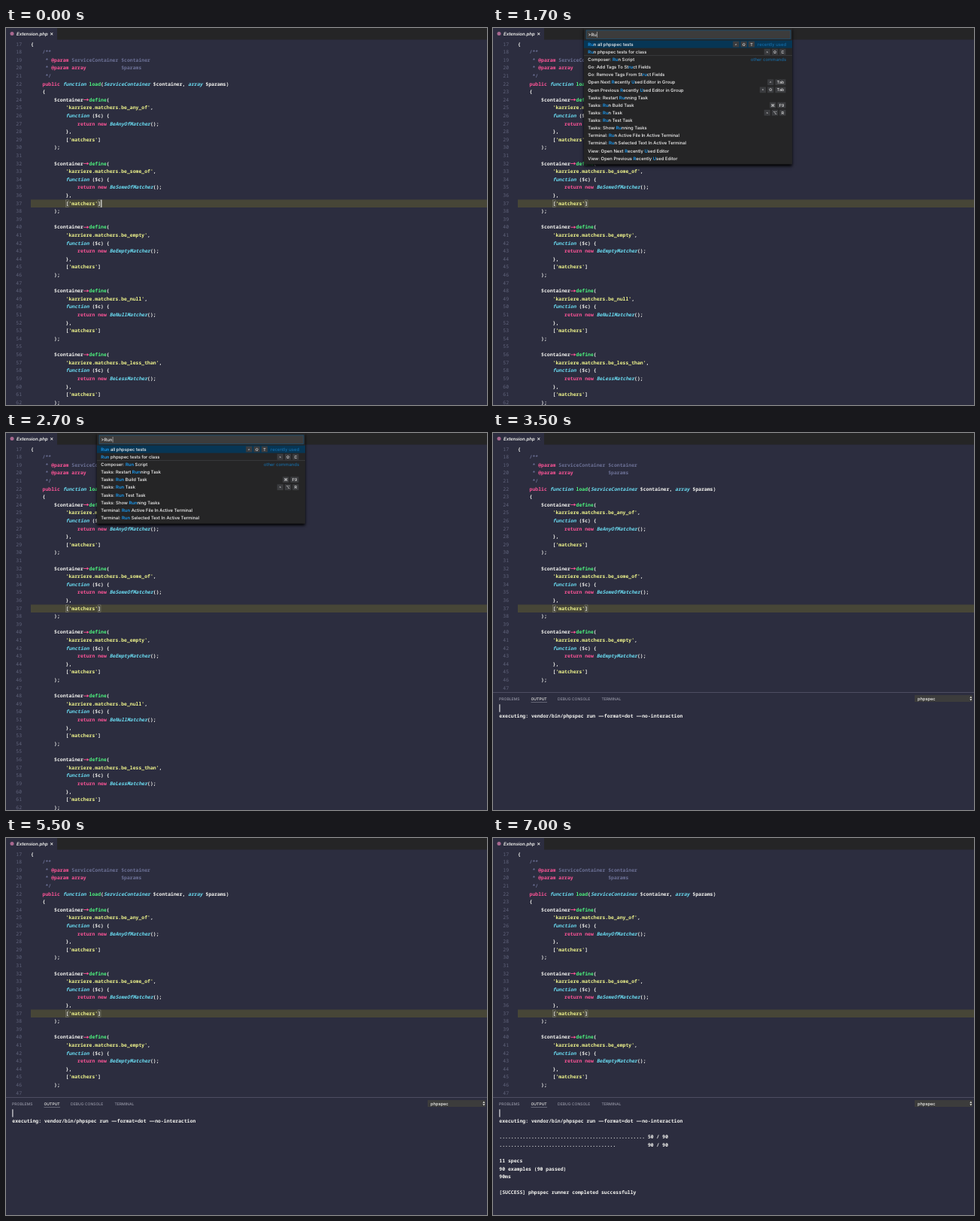
Animation, 640 px wide and 502 px high, one loop 7100 ms. Source, as an HTML page with a canvas:

```html
<!DOCTYPE html>
<html lang="en">
<head>
<meta charset="utf-8">
<title>Running specs from the editor</title>
<style>
html, body { margin: 0; width: 100%; height: 100%; overflow: hidden; background: #2c2d3f; }
canvas { display: block; }
</style>
</head>
<body>
<canvas id="stage" width="640" height="502"></canvas>
<script>
const ctx = document.getElementById('stage').getContext('2d');
ctx.textRendering = 'geometricPrecision';

const LOOP = 7100, OPEN = 900, TYPE_RU = 1600, TYPE_RUN = 1800, RUN = 3000, DONE = 6700;
const CHAR = 3.875, LINE = 10.605, ROW = 10.13, UI = 5.92;
const BG = '#2c2d3f', WHITE = '#f6f6f2', PINK = '#fb5496', CYAN = '#6adcf2',
  GREEN = '#4df57f', YELLOW = '#f0f58c', COMMENT = '#6c7196', BLUE = '#1a9cf5';

const definition = (id, name) => `        $container->define(
            'karriere.matchers.be_${id}',
            function ($c) {
                return new Be${name}Matcher();
            },
            ['matchers']
        );
`;
const source = `{
    /**
     * @param ServiceContainer $container
     * @param array            $params
     */
    public function load(ServiceContainer $container, array $params)
    {
` + [['any_of', 'AnyOf'], ['some_of', 'SomeOf'], ['empty', 'Empty'], ['null', 'Null'], ['less_than', 'Less']]
  .map(([id, name]) => definition(id, name)).join('\n');
const sourceLines = source.trimEnd().split('\n');

const recent = `Run all phpspec tests|^ ⇧ T
Run phpspec tests for class|^ ⇧ C
`;
const palettes = {
  '>': { split: 13, match: null, list: recent + `Simple PHP CS Fixer: Fix
Project Manager: Save Project
Extensions: Check for Updates
Sync : Download Settings|⇧ ⌥ D
Extensions: Enable Auto Updating Extensions
New PHP Class
New PHP File
Check PHP import
Extensions: Install Extensions
Go: Add Import
Preferences: File Icon Theme
Add Cursor Above|⌥ ⌘ ↑
Add Cursor Below|⌥ ⌘ ↓
Add Cursors to Line Ends|⇧ ⌥ I
Add Line Comment|⌘ K ⌘ C
Add Selection To Next Find Match|^ G
Add Selection To Previous Find Match
Change All Occurrences|⌘ F2` },
  '>Ru': { split: 2, match: /(ru|R(?=ecently)|U(?=sed))/i, list: recent + `Composer: Run Script
Go: Add Tags To Struct Fields
Go: Remove Tags From Struct Fields
Open Next Recently Used Editor in Group|^ Tab
Open Previous Recently Used Editor in Group|^ ⇧ Tab
Tasks: Restart Running Task
Tasks: Run Build Task|⌘ F9
Tasks: Run Task|^ ⌥ R
Tasks: Run Test Task
Tasks: Show Running Tasks
Terminal: Run Active File In Active Terminal
Terminal: Run Selected Text In Active Terminal
View: Open Next Recently Used Editor
View: Open Previous Recently Used Editor` },
  '>Run': { split: 2, match: /(run)/i, list: recent + `Composer: Run Script
Tasks: Restart Running Task
Tasks: Run Build Task|⌘ F9
Tasks: Run Task|^ ⌥ R
Tasks: Run Test Task
Tasks: Show Running Tasks
Terminal: Run Active File In Active Terminal
Terminal: Run Selected Text In Active Terminal` }
};

const report = ['', '', '', '.'.repeat(50) + ' 50 / 90', '.'.repeat(40) + ' '.repeat(11) + '90 / 90', '',
  '11 specs', '90 examples (90 passed)', '90ms', '', '[SUCCESS] phpspec runner completed successfully'];

function rect(x, y, w, h, color) {
  ctx.fillStyle = color;
  ctx.fillRect(x, y, w, h);
}

// Proportional text, vertically centred on y; returns its width.
function label(text, x, y, color, size = UI, style = '500', align = 'left') {
  ctx.font = `${style} ${size}px Inter, "DejaVu Sans", sans-serif`;
  ctx.textAlign = align;
  ctx.fillStyle = color;
  ctx.fillText(text, x, y + size * 0.36);
  return ctx.measureText(text).width;
}

// Monospaced text on a fixed grid, with joined "--" and "->".
function mono(text, x, y, color, style = '600') {
  ctx.font = `${style} 6.46px "Noto Sans Mono", monospace`;
  ctx.textAlign = 'left';
  ctx.fillStyle = color;
  for (let i = 0; i < text.length; i++, x += CHAR) {
    const pair = text.substr(i, 2);
    if (pair === '--' || pair === '->') {
      ctx.fillRect(x + 0.5, y - 0.4, 6.6, 0.9);
      if (pair === '->') {
        ctx.beginPath();
        ctx.moveTo(x + 5, y - 2);
        ctx.lineTo(x + 7.5, y);
        ctx.lineTo(x + 5, y + 2);
        ctx.fill();
      }
      i++;
      x += CHAR;
    } else if (text[i] !== ' ') ctx.fillText(text[i], x, y + 2.2);
  }
}

function codeLine(line, y) {
  const isComment = /^\s*(\/\*|\*)/.test(line);
  const rule = isComment ? /(@param|array)|[^@a]+|./g
    : /('[^']*')|(->)|(return new|public)|(function|\w*Matcher\b|ServiceContainer|array\b)|(load|define)|\w+|[^'\w-]+/g;
  for (const m of line.matchAll(rule)) {
    const x = 33 + m.index * CHAR;
    if (isComment) mono(m[0], x, y, m[1] ? PINK : COMMENT);
    else if (m[4]) mono(m[0], x, y, CYAN, 'italic 600');
    else mono(m[0], x, y, m[1] ? YELLOW : m[2] || m[3] ? PINK : m[5] ? GREEN : WHITE);
  }
}

function editor(showCaret) {
  rect(0, 0, 640, 502, BG);
  rect(33, 228.5, 607, 10.5, '#474637');
  ctx.lineWidth = 0.4;
  ctx.strokeStyle = '#96968a';
  for (const col of [12, 23]) ctx.strokeRect(33 + col * CHAR, 229, CHAR, 9.2);
  sourceLines.forEach((line, i) => {
    const y = 21.3 + i * LINE, number = String(i + 17);
    mono(number, 21 - number.length * CHAR, y, '#61647c', '400');
    codeLine(line, y);
  });
  if (showCaret) rect(126.4, 228.6, 1, 10.3, '#ffffff');
  rect(68, 0, 572, 15.5, '#252526');
  ctx.fillStyle = '#a8688f';
  ctx.beginPath();
  ctx.arc(8, 7.5, 2.5, 0, 7);
  ctx.fill();
  label('Extension.php', 14, 7.7, WHITE, 6, 'italic 600');
  label('×', 58.3, 7.5, WHITE, 7.5);
}

// Key caps laid out from right to left.
function keyCaps(keys, right, y) {
  for (const key of keys.split(' ').reverse()) {
    const width = key === 'Tab' ? 14 : key.length > 1 ? 11 : 8.2;
    rect(right - width, y - 3.9, width, 7.8, '#3b3c3f');
    label(key, right - width / 2, y + (key === '^' ? 1 : 0), '#e6e6e6', 5.3, '500', 'center');
    right -= width + 2.1;
  }
}

function palette(query) {
  const { split, match, list } = palettes[query];
  const rows = list.split('\n');
  ctx.save();
  ctx.shadowColor = '#000';
  ctx.shadowBlur = 3.7;
  ctx.shadowOffsetY = 2.3;
  rect(121, 0, 277, 19.4 + rows.length * ROW, '#252526');
  ctx.restore();
  rect(124, 3, 272, 11.5, '#3c3c3c');
  ctx.lineWidth = 0.5;
  ctx.strokeStyle = '#0e639c';
  ctx.strokeRect(124, 3, 272, 11.5);
  const queryWidth = label(query, 126.5, 8.7, '#e6e6e6');
  rect(126.9 + queryWidth, 5, 0.6, 7.6, '#d0d0d0');
  rect(121, 16.5, 277, ROW, '#073655');
  rect(121, 16.5 + split * ROW - 0.3, 277, 0.6, '#45464c');
  rows.forEach((row, i) => {
    const [title, keys] = row.split('|'), y = 21.6 + i * ROW;
    let x = 126.3, right = 389.5;
    (match ? title.split(match) : [title]).forEach((part, n) => {
      x += label(part, x, y, n % 2 ? BLUE : '#f6f6f6', UI, n % 2 ? '600' : '500');
    });
    const group = i === 0 ? 'recently used' : i === split ? 'other commands' : '';
    if (group) right -= label(group, 390, y, '#1674b4', UI, '400', 'right') + 3.5;
    if (keys) keyCaps(keys, right, y);
  });
}

function panel(done) {
  rect(0, 345, 640, 157, BG);
  rect(0, 345, 640, 0.8, '#55566a');
  const tabs = [['PROBLEMS', 8], ['OUTPUT', 50.5], ['DEBUG CONSOLE', 86], ['TERMINAL', 144.5]];
  for (const [name, x] of tabs) label(name, x, 353.7, name === 'OUTPUT' ? WHITE : '#9596a5', 5.05);
  rect(50.5, 358.2, 21.5, 0.6, '#8b8c9c');
  rect(561, 349, 77, 9, '#3c3c3c');
  label('phpspec', 565, 353.5, WHITE, 5.7);
  ctx.fillStyle = WHITE;
  for (const dir of [-1, 1]) {
    ctx.beginPath();
    ctx.moveTo(634.3, 353.5 + dir * 0.7);
    ctx.lineTo(637.3, 353.5 + dir * 0.7);
    ctx.lineTo(635.8, 353.5 + dir * 2.8);
    ctx.fill();
  }
  rect(8.4, 361.3, 1, 10.3, '#ffffff');
  const output = (text, row) => mono(text, 8.3, 366.5 + row * 10.55, WHITE);
  output('executing: vendor/bin/phpspec run --format=dot --no-interaction', 1);
  if (done) report.forEach(output);
}

function draw(now) {
  const t = now % LOOP;
  editor(t < OPEN);
  if (t >= RUN) panel(t >= DONE);
  else if (t >= OPEN) palette(t < TYPE_RU ? '>' : t < TYPE_RUN ? '>Ru' : '>Run');
  requestAnimationFrame(draw);
}
requestAnimationFrame(draw);
</script>
</body>
</html>
```
